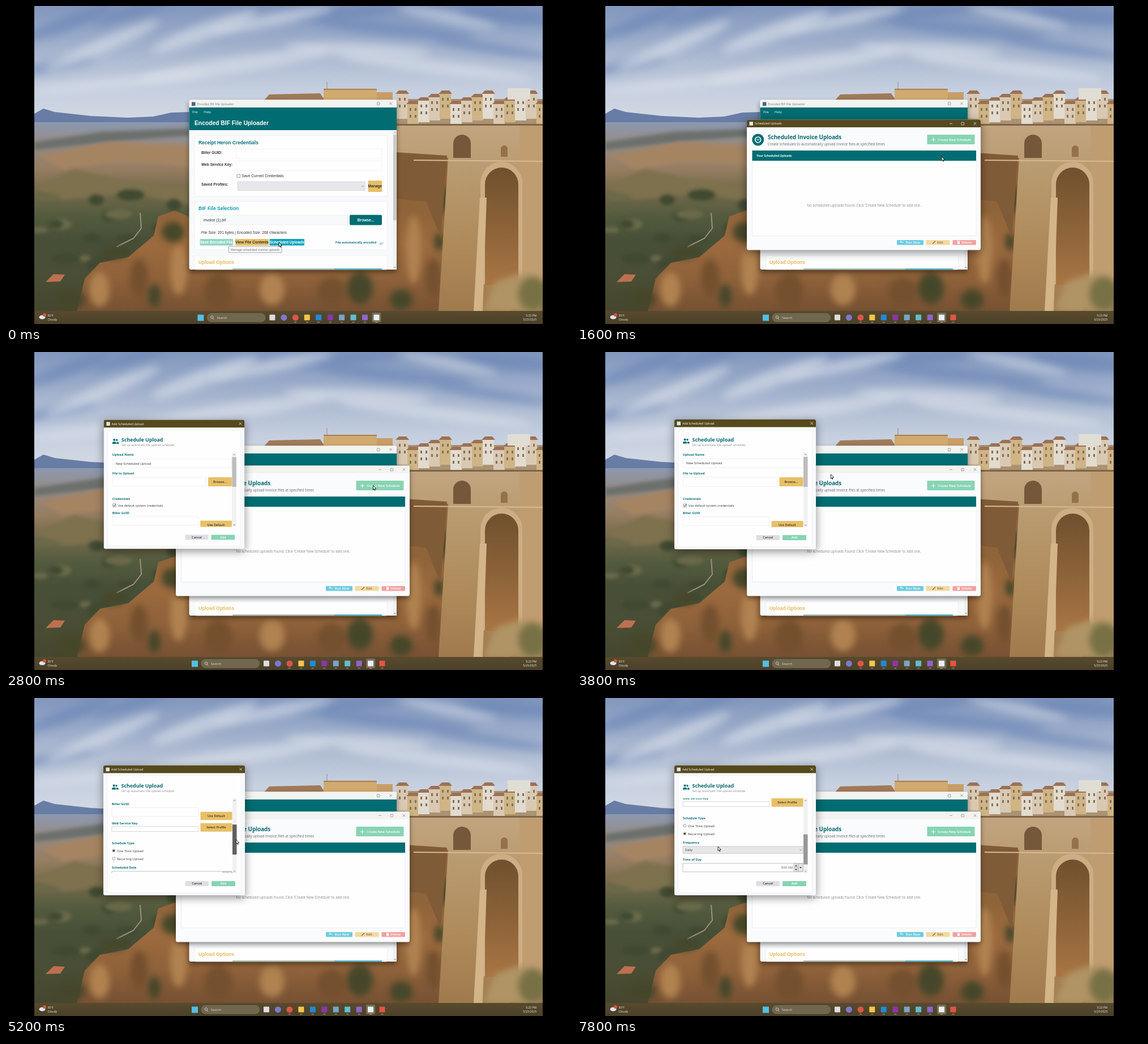
Recreate the animation shown at these times as an HTML page with a canvas. Size 998 by 561 pixels, loop 8000 ms.

```html
<!DOCTYPE html>
<html lang="en">
<head>
<meta charset="utf-8">
<title>Scheduled uploads</title>
<style>
  html, body { margin: 0; width: 100%; height: 100%; overflow: hidden; background: #000; }
  canvas { display: block; width: 100vw; height: 100vh; }
</style>
</head>
<body>
<canvas id="stage" width="998" height="561"></canvas>
<script>
const LOOP = 8000, STEP = 200;
const UI = '"Open Sans", sans-serif', ARIAL = '"Liberation Sans", Arial, sans-serif';
const TEAL = '#016d72', GOLD = '#e7bf66', MINT = '#87d4b3', OLIVE = '#55491d', INK = '#333';

const stage = document.getElementById('stage');
const wallpaper = document.createElement('canvas');
wallpaper.width = 998;
wallpaper.height = 561;
let c = wallpaper.getContext('2d');

// ---------- drawing helpers ----------
function box(x, y, w, h, fill, stroke, r = 0) {
  c.beginPath();
  c.roundRect(x, y, w, h, r);
  if (fill) { c.fillStyle = fill; c.fill(); }
  if (stroke) { c.strokeStyle = stroke; c.lineWidth = 0.7; c.stroke(); }
}
function disc(x, y, rx, fill, ry = rx, turn = 0) {
  c.beginPath();
  c.ellipse(x, y, rx, ry, turn, 0, 7);
  c.fillStyle = fill;
  c.fill();
}
function path(points, close) {
  c.beginPath();
  for (let i = 0; i < points.length; i += 2) c.lineTo(points[i], points[i + 1]);
  if (close) c.closePath();
}
function poly(points, fill) {
  path(points, true);
  c.fillStyle = fill;
  c.fill();
}
function line(points, color, width = 0.8) {
  path(points);
  c.strokeStyle = color;
  c.lineWidth = width;
  c.stroke();
}
// y is the middle of the capital letters
function text(str, x, y, size, color = INK, { font = UI, weight = 400, align = 'left' } = {}) {
  c.font = `${weight} ${size}px ${font}`;
  c.textAlign = align;
  c.fillStyle = color;
  c.fillText(str, x, y + size * 0.35);
}
const arial = (str, x, y, size, color, weight = 400) => text(str, x, y, size, color, { font: ARIAL, weight });
function button(label, x, y, w, h, fill, color, size, font = UI, r = 1, shift = 0) {
  box(x, y, w, h, fill, null, r);
  text(label, x + w / 2 + shift, y + h / 2, size, color, { font, weight: font === ARIAL ? 700 : 600, align: 'center' });
}
function shade(y0, y1, ...stops) {
  const g = c.createLinearGradient(0, y0, 0, y1);
  stops.forEach((color, i) => g.addColorStop(i / (stops.length - 1), color));
  return g;
}

// ---------- wallpaper ----------
function paintWallpaper() {
  let seed = 11;
  const rnd = () => (seed = seed * 16807 % 2147483647) / 2147483647;
  c.save();
  c.beginPath();
  c.rect(50, 0, 898, 561);
  c.clip();
  box(50, 0, 898, 215, shade(0, 200, '#8297bd', '#97a9c8', '#b0bdd3', '#c5cfdf', '#d3d9e3'));
  c.filter = 'blur(8px)';
  const cloud = 'rgba(222,227,236,.6)', gap = 'rgba(102,131,181,.6)';
  [[110,30,80,12,-.35], [220,12,70,9,-.3], [690,42,140,11,.1], [890,18,90,14,.1], [600,14,90,9,-.1], [860,75,110,9,.15], [90,105,70,9,-.2]]
    .forEach(([x, y, rx, ry, turn]) => disc(x, y, rx, gap, ry, turn));
  [[170,70,110,12,-.4], [350,45,100,14,-.35], [470,25,110,10,-.2], [400,105,170,14,-.15], [620,78,130,12,.05], [780,20,90,7,.2], [760,108,170,11,.12], [200,135,160,9,-.1]]
    .forEach(([x, y, rx, ry, turn]) => disc(x, y, rx, cloud, ry, turn));
  c.filter = 'none';

  poly([50,190, 66,181, 86,187, 150,194, 215,197, 260,195, 292,188, 325,187, 470,190, 470,270, 50,270], '#687da5');
  box(50, 205, 420, 334, shade(205, 538, '#8c98b0', '#978b82', '#957d60', '#71684a', '#535b3e', '#474f37', '#494f37', '#484c32', '#46462f'));
  c.filter = 'blur(3px)';
  poly([50,240, 170,222, 324,216, 324,229, 200,238, 50,254], '#6b706c');
  poly([60,265, 180,240, 324,246, 324,282, 190,276, 100,288], '#a58462');
  poly([50,320, 120,288, 200,306, 324,318, 324,350, 220,330, 100,342], '#7d714e');
  for (let i = 0; i < 26; i++) disc(60 + rnd() * 260, 330 + rnd() * 145, 10 + rnd() * 15, i % 3 ? '#404a31' : '#6a6a4a', 5 + rnd() * 6);
  c.filter = 'none';
  line([195,425, 225,410, 239,392, 237,365], '#9b9278', 2);
  poly([70,487, 84,473, 104,474, 96,486], '#bd7050');

  poly([125,538, 139,481, 166,453, 216,443, 261,405, 269,371, 298,361, 324,372, 324,465, 690,465, 690,205, 948,205, 948,538],
    shade(360, 538, '#8f6439', '#9c6a3e', '#8f623a', '#765133'));
  c.filter = 'blur(6px)';
  [[165,500,18,30], [235,480,16,34], [305,465,15,45], [375,504,25,32], [470,500,22,28], [575,505,25,26], [720,430,13,60], [755,480,14,35]]
    .forEach(([x, y, rx, ry], i) => disc(x, y, rx, i % 2 ? '#74502f' : '#b08250', ry));
  [[114,517,25,18], [190,435,22,11], [262,511,11,20], [295,399,20,18], [625,498,23,28], [698,518,20,18], [750,286,15,20], [765,416,9,16], [770,340,10,25]]
    .forEach(([x, y, rx, ry]) => disc(x, y, rx, '#46472a', ry));
  c.filter = 'none';

  // bridge
  poly([690,208, 948,208, 948,490, 890,538, 764,538, 781,268, 690,259], shade(208, 538, '#c2a580', '#b6976b', '#ae8959', '#a07a4d'));
  poly([690,258, 779,264, 768,408, 742,345, 690,340], '#805b38');
  poly([907,210, 948,205, 948,485, 909,505], '#c09d71');
  const arch = (x, y, w, h, fill) => box(x, y, w, h, fill, null, [w / 2, w / 2, 0, 0]);
  arch(838, 275, 74, 216, '#cdad83');
  arch(846, 285, 59, 207, shade(285, 490, '#70502f', '#8b6238', '#a87543'));
  arch(790, 227, 31, 41, '#75583a');
  arch(874, 246, 12, 20, '#957149');
  poly([837,338, 849,338, 842,538, 826,538], '#d3b589');
  box(690, 207, 258, 4, '#7e6548');
  line([720,272, 948,274], '#d6ba91', 2);
  c.filter = 'blur(6px)';
  poly([842,538, 865,487, 906,472, 948,480, 948,545], '#b09465');
  disc(930, 508, 25, '#777145', 30);
  c.filter = 'none';

  // town
  box(690, 164, 258, 44, '#ab9272');
  for (let i = 0; i < 14; i++) {
    const x = 690 + i * 19, y = 155 + (i * 7 % 4) * 6, tone = ['#d9c9b2', '#cfb486', '#e2dbcf'][i % 3];
    box(x, y, 20, 44 - (y - 155) * 0.5, tone);
    poly([x - 2, y, x + 4, y - 6, x + 17, y - 6, x + 22, y], '#9b7156');
    for (let k = 0; k < 4; k++) box(x + 4 + k % 2 * 9, y + 7 + (k >> 1) * 12, 3, 5, '#85715b');
  }
  box(886, 145, 40, 20, '#e0ddd5');
  poly([456,166, 465,156, 555,154, 563,166], '#a07a58');
  box(561, 147, 94, 19, '#d0aa6e');
  box(561, 146, 94, 2, '#aa7d4d');
  box(655, 152, 28, 14, '#c99d68');
  line([567,134, 567,147], '#777', 0.7);
  box(50, 538, 898, 23, shade(538, 561, '#584a2d', '#4b4029'));
  c.restore();
}

// ---------- taskbar ----------
function taskbar(recording) {
  disc(64, 549, 5.5, '#dde6ef', 3.6);
  disc(68, 545, 3, '#d8543f');
  text('50°F', 73.5, 546, 5, '#eee');
  text('Cloudy', 73.5, 553.5, 5.2, '#eee');
  text('5:23 PM', 937, 546, 5, '#eee', { align: 'right' });
  text('5/23/2025', 937, 553.5, 5, '#eee', { align: 'right' });
  c.save();
  c.translate(recording ? 0 : 10.4, 0);
  box(328, 544.5, 11, 11, '#50c0e4');
  box(345, 542.5, 102.5, 14.5, '#71664e', '#817761', 7);
  c.beginPath();
  c.arc(353.5, 549, 2.3, 0, 7);
  c.strokeStyle = '#eee';
  c.stroke();
  line([355,551, 357,553], '#eee');
  text('Search', 362, 550, 5.8, '#ddd');
  const icons = ['#ddd', '*#7d78ce', '*#dd5545', '#f4c64b', '#2289d6', '#8d35a5', '#7aa5c5', '#60bdd0', '#8e64ca', '#e8f0f5', '#e65340'];
  icons.slice(0, recording ? 11 : 10).forEach((color, i) => {
    const x = 460 + i * 20.45;
    if (i === 9) box(x - 8, 541, 16, 17, '#796e56', null, 2);
    if (color[0] === '*') disc(x, 549.7, 5.5, color.slice(1));
    else box(x - 5, 544.5, 10, 10, color, null, 1);
    if (i > 1) line([x - 2, 557.8, x + 2, 557.8], i === 9 ? '#e2bd65' : '#aaa', 1);
  });
  c.restore();
}

// ---------- windows ----------
function frame(x, y, w, h, bar, title, active, fill) {
  c.save();
  c.shadowColor = 'rgba(0,0,0,.45)';
  c.shadowBlur = active ? 16 : 9;
  c.shadowOffsetY = 4;
  box(x, y, w, h, fill, null, 3);
  c.restore();
  box(x, y, w, bar, active ? OLIVE : '#f3f3f1', null, [3, 3, 0, 0]);
  box(x + 4.5, y + bar / 2 - 3, 6.5, 6.5, active ? '#dce7ee' : '#49647b');
  text(title, x + 14, y + bar / 2 + 0.3, 5.35, active ? '#fff' : '#777');
}
function windowControls(right, y, active, { maximize = true, minimize = true } = {}) {
  const color = active ? '#eee' : '#888';
  line([right - 2.3, y - 2.3, right + 2.3, y + 2.3], color);
  line([right + 2.3, y - 2.3, right - 2.3, y + 2.3], color);
  if (maximize) box(right - 24, y - 2, 4.5, 4.5, null, color);
  if (minimize) line([right - 45, y, right - 40, y], color);
}
function arrow(x, y, dir, color = '#777') {
  line([x - 1.7, y - dir, x, y + dir, x + 1.7, y - dir], color);
}

function uploaderWindow(active) {
  frame(323.5, 165.5, 366.5, 299.5, 14, 'Encoded BIF File Uploader', active, '#f7f9fb');
  windowControls(679.5, 172, active, { minimize: false });
  box(323.5, 179, 366.5, 40, TEAL);
  text('File', 329, 187, 6, '#fff');
  text('Help', 349, 187, 6, '#fff');
  arial('Encoded BIF File Uploader', 333, 206.5, 10.3, '#fff', 700);

  [[228.5, 107], [345, 85], [440, 25]].forEach(([y, h]) => box(333.5, y, 340, h, '#fefefe', '#e9ecef', 2));
  box(684, 220, 6, 245, '#f0f0f0');
  box(684, 227, 5.5, 151, '#c9c9c9');
  arrow(687, 223, -1);
  arrow(687, 461, 1);

  arial('Receipt Heron Credentials', 340, 241, 8.47, '#0b6f7e', 700);
  arial('Biller GUID:', 345, 259, 6.6, INK, 700);
  arial('Web Service Key:', 345, 279.5, 6.6, INK, 700);
  box(407, 252, 257, 17, '#fff', '#eceef0');
  box(407, 273.5, 257, 17, '#fff', '#eceef0');
  box(408, 297, 5.5, 5.5, '#fff', '#777');
  arial('Save Current Credentials', 416.5, 300, 6.6, INK);
  arial('Saved Profiles:', 345, 314.5, 6.6, INK, 700);
  box(409, 310, 225.5, 15.5, '#e6e6eb', '#cfcfda');
  arrow(630, 318, 0.8);
  button('Manage', 639.5, 308, 24.5, 20, GOLD, INK, 6.6, ARIAL);

  arial('BIF File Selection', 340, 357, 8.5, '#0e9bb4', 700);
  box(343, 369, 261, 17, '#f8f9fb', '#e4e8ec');
  arial('invoice (1).bif', 349, 377.5, 6.6, INK);
  button('Browse...', 607, 368.5, 57, 18, TEAL, '#fff', 6.6, ARIAL, 2);
  arial('File Size: 201 bytes | Encoded Size: 268 characters', 345, 400, 6.6, INK);
  button('Save Encoded File', 342.5, 411, 58.5, 11.5, '#91d5c6', '#fff', 6.5, ARIAL);
  button('View File Contents', 405, 411, 59, 11.5, GOLD, INK, 6.6, ARIAL);
  button('Scheduled Uploads', 465.5, 411, 61.5, 11.5, '#0aa4bd', '#fff', 6.6, ARIAL);
  arial('File automatically encoded', 582, 417, 5.65, '#0b6f7e', 700);
  line([660,418.8, 662,420.3, 666,417.2], '#0b8b9b', 1);

  arial('Upload Options', 340, 452, 8.46, '#e8b95c', 700);
  box(400, 463.3, 180, 1.5, '#84a996');
  box(580, 463.3, 84, 1.5, '#0a98ad');
}
function tooltip() {
  box(393.5, 424, 93.5, 11, '#f8f8f8', '#888');
  text('Manage scheduled invoice uploads', 397, 429.8, 5.3, '#666');
}

function scheduleWindow(active) {
  frame(300, 200.5, 413, 230, 13.5, 'Scheduled Uploads', active, '#fafbfc');
  windowControls(703, 207.3, active);
  disc(319.7, 236, 10.5, TEAL);
  c.beginPath();
  c.arc(319.7, 236, 5, 0, 7);
  c.strokeStyle = '#fff';
  c.lineWidth = 1.6;
  c.stroke();
  line([317.5,234.5, 319.7,237, 322,234.5], '#fff', 1.1);
  text('Scheduled Invoice Uploads', 337, 231.5, 9.8, '#086870', { weight: 700 });
  text('Create schedules to automatically upload invoice files at specified times', 337, 244, 6.22, '#666');
  button('Create New Schedule', 618.5, 227, 84, 17, MINT, '#fff', 5.75, UI, 1, 6);
  line([626,236, 633,236], '#fff', 1);
  line([629.5,232.5, 629.5,239.5], '#fff', 1);

  box(309.5, 255, 395.5, 150.5, '#fefefe', '#e3e5e8');
  box(309.5, 255, 395.5, 18, TEAL);
  text('Your Scheduled Uploads', 317, 264.5, 5.2, '#fff', { weight: 700 });
  text("No scheduled uploads found. Click 'Create New Schedule' to add one.", 507, 352, 6.25, '#888', { align: 'center' });

  button('Run Now', 565, 413, 47, 8.5, '#6ccbe0', '#fff', 5.8, UI, 1, 5);
  line([577,417, 571,417, 571,415, 574.5,415], '#fff');
  button('Edit', 616.5, 413, 42, 8.5, '#f3d99d', '#77705f', 5.8, UI, 1, 4);
  line([628,419.5, 633,414.7], '#77705f', 1.4);
  button('Delete', 663.5, 413, 41.5, 8.5, '#f2a19f', '#fff', 5.8, UI, 1, 4);
  box(672, 415.5, 4, 4.2, '#fff');
  line([671.3,414.7, 676.7,414.7], '#fff');
}

const label = (str, y) => text(str, 187, y, 5.6, '#0a7078', { weight: 700 });
function spinner(value, y, h) {
  box(187, y, 212, h, '#fff', '#aaa');
  text(value, 381, y + h / 2, 5.4, '#555', { align: 'right' });
  box(383, y + 0.5, 8, h / 2 - 0.5, '#e5e5e5', '#aaa');
  box(383, y + h / 2, 8, h / 2 - 0.5, '#e5e5e5', '#aaa');
  box(391, y + 0.5, 8, h - 1, '#e5e5e5', '#aaa');
  poly([385,y + 5, 387,y + 2.7, 389,y + 5], '#222');
  poly([385,y + h - 5, 387,y + h - 2.7, 389,y + h - 5], '#222');
  poly([393,y + h / 2 - 1, 397,y + h / 2 - 1, 395,y + h / 2 + 1.2], '#222');
}
function radio(str, y, on) {
  c.beginPath();
  c.arc(190.3, y, 2.5, 0, 7);
  c.strokeStyle = '#777';
  c.lineWidth = 0.7;
  c.stroke();
  if (on) disc(190.3, y, 1.5, '#222');
  text(str, 196, y + 0.3, 5.75);
}

function scheduleForm(recurring) {
  const pale = '#e6e9ec';
  label('Upload Name', 181);
  box(187, 188.5, 212, 15.5, '#fff', pale);
  text('New Scheduled Upload', 193, 196.3, 5.85);
  label('File to Upload', 214.3);
  box(187, 221, 166, 16, '#fff', pale);
  button('Browse...', 357.5, 221, 42, 16, GOLD, INK, 5.5);
  label('Credentials', 259.5);
  box(188, 268, 5.5, 5.5, '#fff', '#777');
  line([189,270.7, 190.4,272.2, 193,268.9], '#222', 0.9);
  text('Use default system credentials', 196.5, 271.3, 5.68);
  label('Biller GUID', 284);
  box(187, 290.5, 153, 15.5, '#fff', pale);
  button('Use Default', 343.5, 298, 56, 14.5, GOLD, INK, 5.5);
  label('Web Service Key', 318);
  box(187, 324, 153, 8.7, '#fff', '#c6c8cb');
  button('Select Profile', 343.5, 318, 56, 15, GOLD, INK, 5.5);
  label('Schedule Type', 353);
  radio('One Time Upload', 366.5, !recurring);
  radio('Recurring Upload', 380.5, recurring);
  if (recurring) {
    label('Frequency', 396);
    box(187, 403, 212, 12.5, '#e7e7e7', '#bbb');
    text('Daily', 191, 409.5, 5.7);
    arrow(395, 409.3, 0.8);
    label('Time of Day', 426.3);
    spinner('8:00 AM', 433, 15);
  } else {
    label('Scheduled Date', 396);
    spinner('5/24/2025', 403, 15.5);
    label('Time of Day', 429.3);
    spinner('8:00 AM', 436, 15);
  }
}

function addDialog({ scroll, dragging, recurring }) {
  frame(172, 119, 250, 229, 13.5, 'Add Scheduled Upload', true, '#f8f9fa');
  windowControls(414.7, 125.7, true, { maximize: false, minimize: false });
  box(179, 137, 236, 206, '#fefefe', '#eceef0', 2);
  disc(190.5, 154.5, 2, TEAL);
  disc(195, 154.8, 1.7, TEAL);
  box(187, 157.7, 7.2, 3.8, TEAL, null, [3, 3, 0, 0]);
  box(195, 157.9, 3.8, 3.6, TEAL, null, [1, 3, 0, 0]);
  text('Schedule Upload', 203.5, 154.5, 8.9, '#086870', { weight: 700 });
  text('Set up automatic file upload schedule', 203.5, 164, 5.37, '#888');

  c.save();
  c.beginPath();
  c.rect(186, 177, 214, 132);
  c.clip();
  c.translate(0, -scroll);
  scheduleForm(recurring);
  c.restore();

  box(400, 177, 7.5, 132, '#f1f1f1');
  arrow(403.7, 181, -1);
  arrow(403.7, 305.5, 1);
  box(400, 185 + scroll * 59 / 150, 7.5, 53, dragging ? '#606060' : recurring ? '#989898' : '#bdbdbd');
  button('Cancel', 316.5, 323, 41.5, 9, '#dddfe3', INK, 5.6);
  button('Add', 363, 323, 42, 9, MINT, '#fff', 5.6);
}

// ---------- motion ----------
const RECORDING = 200, LIST_OPENS = 1020, DIALOG_OPENS = 2620;
const GRAB = 4300, DRAG = [4600, 5600], RELEASE = 6450, PICK_RECURRING = 7150;

const ease = (t, from, to) => {
  const k = Math.min(1, Math.max(0, (t - from) / (to - from)));
  return k * k * (3 - 2 * k);
};
function popup(age, cx, cy, draw) {
  if (age < 0) return;
  const k = 1 - (1 - Math.min(1, age / 300)) ** 3, scale = 0.9 + 0.1 * k;
  c.save();
  c.globalAlpha = Math.min(1, k * 1.5);
  c.translate(cx, cy);
  c.scale(scale, scale);
  c.translate(-cx, -cy);
  draw();
  c.restore();
}
// each stop: start, end, x, y
const moves = [
  [1150, 1600, 644, 265.5], [1600, 1900, 648.5, 235.5], [3000, 4100, 403.5, 211.5],
  [...DRAG, 408, 270.5], [RELEASE, 7000, 191, 230], [7200, 7700, 249, 262]
];
function pointer(t) {
  let x = 482, y = 417;
  for (const [from, to, tx, ty] of moves) {
    const k = ease(t, from, to);
    x += (tx - x) * k;
    y += (ty - y) * k;
  }
  path([x, y, x, y + 7.5, x + 1.7, y + 6, x + 2.8, y + 8.6, x + 4, y + 8, x + 2.9, y + 5.6, x + 5.2, y + 5.4], true);
  c.fillStyle = '#fff';
  c.fill();
  c.strokeStyle = '#111';
  c.lineWidth = 0.9;
  c.stroke();
}

function render(t) {
  const listAge = t - LIST_OPENS, dialogAge = t - DIALOG_OPENS;
  const recording = t >= RECORDING, recurring = t >= PICK_RECURRING;
  c.clearRect(0, 0, 998, 561);
  c.drawImage(wallpaper, 0, 0);
  taskbar(recording);
  uploaderWindow(recording && listAge < 0);
  if (listAge < 0) tooltip();
  popup(listAge, 506.5, 315.5, () => scheduleWindow(dialogAge < 0));
  popup(dialogAge, 297, 233.5, () => addDialog({
    scroll: recurring ? 141.3 : 150 * ease(t, ...DRAG),
    dragging: t >= GRAB && t < RELEASE,
    recurring
  }));
  pointer(t);
}

paintWallpaper();
c = stage.getContext('2d');
function tick() {
  const t = performance.now() % LOOP;
  render(Math.floor(t / STEP) * STEP);
  requestAnimationFrame(tick);
}
tick();
</script>
</body>
</html>
```
